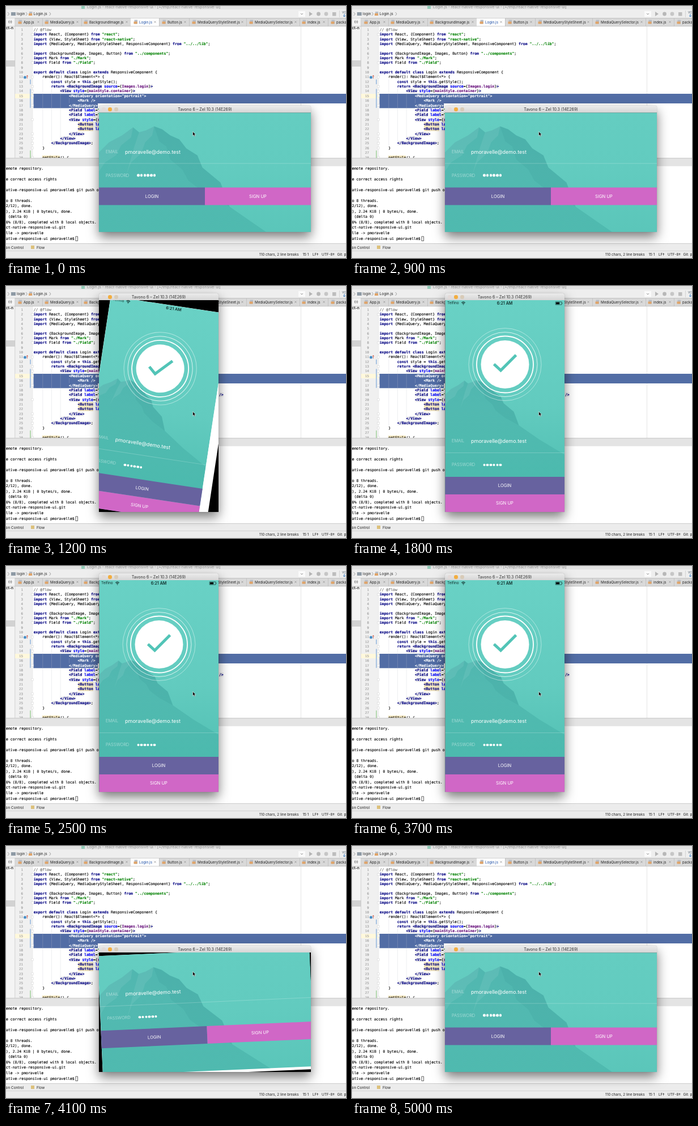
Animation, 600 px wide and 445 px high, one loop 5100 ms. Source, as an HTML page:

```html
<!DOCTYPE html>
<html lang="en">
<head>
<meta charset="utf-8">
<title>Rotating login screen</title>
<style>
html, body { margin: 0; width: 100%; height: 100%; overflow: hidden; background: #fff; }
#stage { position: absolute; left: 0; top: 0; width: 600px; height: 445px; overflow: hidden; font-family: Inter, Roboto, sans-serif; }
#stage > svg, pre { position: absolute; left: 0; top: 0; }
pre { margin: 0; color: #000; font-family: "DejaVu Sans Mono", monospace; -webkit-text-stroke: .12px; }
#editor { left: 48.7px; top: 37.8px; height: 230.7px; overflow: hidden; font-size: 6.48px; line-height: 8.36px; }
#nums { left: 14px; top: 37.8px; width: 16px; height: 230.7px; overflow: hidden; text-align: right; color: #999; font-size: 5.8px; line-height: 8.36px; }
#term { left: 0; top: 282.6px; font-size: 6.48px; line-height: 9.53px; }
.com { color: #666; }
.str { color: #008000; font-weight: bold; }
.key, .tag { color: #000080; font-weight: bold; }
.att { color: #0000ff; font-weight: bold; }
.tag, .att { background: #f1f1f1; }
.mem { color: #660e7a; font-weight: bold; }
.hit { background: #f3e6c0; }
.sel, .sel span { color: #fff; background: none; }

#win { --w: 374px; --h: 211px; position: absolute; left: 164px; bottom: 46px; width: var(--w); border-radius: 4px 4px 0 0;
  box-shadow: 0 0 1px rgba(0,0,0,.45), 0 9px 20px rgba(0,0,0,.52); }
#win.tall { --w: 211px; --h: 374px; }
#bar { position: relative; height: 12px; border-radius: 4px 4px 0 0; background: linear-gradient(#ebebeb, #d6d6d6);
  font-size: 7.07px; line-height: 13px; text-align: center; color: #333; }
#bar i { position: absolute; top: 3px; width: 6.5px; height: 6.5px; border-radius: 50%; }
#screen { position: relative; height: var(--h); overflow: hidden; background: #000; }
#layer { position: absolute; left: 50%; top: 50%; background: #fff; }
#page { position: absolute; left: 0; top: 0; width: var(--w); height: var(--h); color: #fff; }
#page > svg { position: absolute; left: 0; top: 0; width: 100%; height: 100%; }
#form { position: absolute; left: 0; right: 0; top: 48px; }
.tall #form { top: 228px; }
.row { position: relative; box-sizing: border-box; height: 42px; line-height: 42px; }
.row:first-child { border-bottom: 1px solid rgba(255,255,255,.22); }
.row span { position: absolute; left: 12px; font-size: 7.4px; font-weight: 300; color: rgba(255,255,255,.6); }
.row b { position: absolute; left: 46px; font-size: 9px; font-weight: 400; }
.row i { position: absolute; top: 18.7px; width: 4.6px; height: 4.6px; border-radius: 50%; background: #fff; }
#btns { display: flex; }
.tall #btns { flex-direction: column; }
#btns div { flex: 1 0 auto; width: 50%; height: 31px; line-height: 31px; text-align: center; font-size: 7.6px; background: #67629f; }
.tall #btns div { width: 100%; }
#btns div + div { background: #d067c6; }
#status { position: absolute; left: 0; right: 0; top: 0; height: 11px; line-height: 11px; text-align: center; font-size: 7.1px; font-weight: 600; color: #12302d; }
#status span { position: absolute; left: 4px; font-size: 6.5px; font-weight: 400; }
#status svg { position: absolute; top: 0; }
#mark, #status { display: none; }
.tall #mark, .tall #status { display: block; }
</style>
</head>
<body>
<div id="stage">
  <svg id="ide" width="600" height="445"></svg>
  <pre id="nums"></pre>
  <pre id="editor"></pre>
  <pre id="term">emote repository.

e correct access rights

ative-responsive-ui pmoravelle$ git push o

o 8 threads.
2/12), done.
), 2.24 KiB | 0 bytes/s, done.
 (delta 0)
0% (8/8), completed with 8 local objects.
ct-native-responsive-ui.git
lle -> pmoravelle
ative-responsive-ui pmoravelle$</pre>
  <div id="win">
    <div id="bar">
      <i style="left:5px;background:#e3dad8"></i><i style="left:16px;background:#f3ad40"></i><i style="left:27px;background:#d8cbb8"></i>
      Tavono 6 – Zel 10.3 (14E269)
    </div>
    <div id="screen">
      <div id="layer">
        <div id="page">
          <svg viewBox="0 0 211 374" preserveAspectRatio="xMidYMid slice">
            <defs>
              <linearGradient id="sky" x2="0" y2="1"><stop stop-color="#69d1c5"/><stop offset=".5" stop-color="#62cbbf"/><stop offset="1" stop-color="#4bbbae"/></linearGradient>
              <linearGradient id="rock" x2="0" y2="1"><stop stop-color="#2f8f92" stop-opacity=".36"/><stop offset=".4" stop-color="#2f9792" stop-opacity=".28"/><stop offset="1" stop-color="#35a89c" stop-opacity=".15"/></linearGradient>
            </defs>
            <path fill="url(#sky)" d="M0 0H211V374H0z"/>
            <path fill="url(#rock)" d="M0 167L10 157 23 150 34 142 40 147 47 145 55 141 63 144 71 150 80 154 87 163 98 170 103 182 121 197 130 221 166 246 211 273V374H0z"/>
            <path fill="#fff" opacity=".07" d="M0 167L10 157 23 150 34 142 32 152 22 160 17 170 6 177 0 186zM55 141L53 150 46 157 42 168 32 177 27 190 35 162 40 147 47 145z"/>
            <path fill="#1f8084" opacity=".1" d="M55 141L60 156 67 161 71 174 83 184 89 195 106 208 130 221 121 197 103 182 98 170 87 163 80 154 71 150 63 144z"/>
          </svg>
          <svg id="mark" viewBox="0 0 211 374" fill="none" stroke="#fff">
            <circle cx="105.5" cy="113.5" r="42.5" fill="#fff" stroke="none"/>
            <circle cx="105.5" cy="113.5" r="50" stroke-width="1.8"/>
            <circle cx="105.5" cy="113.5" r="57" opacity=".75"/>
            <circle cx="105.5" cy="113.5" r="64" opacity=".45"/>
            <path d="M86 113L98 124 125 97" stroke="#52c4b7" stroke-width="5"/>
          </svg>
          <div id="form">
            <div class="row"><span>EMAIL</span><b>pmoravelle@demo.test</b></div>
            <div class="row" id="pass"><span>PASSWORD</span></div>
            <div id="btns"><div>LOGIN</div><div>SIGN UP</div></div>
          </div>
        </div>
        <div id="status"><span>Telfino</span>6:21 AM
          <svg width="9" height="11" style="left:28px" fill="none" stroke="#12302d" stroke-width="1.2"><path d="M.8 4.6Q4 1.6 7.2 4.6M2.2 6.3Q4 4.6 5.8 6.3M3.5 7.8H4.6"/></svg>
          <svg width="14" height="11" style="right:3px" stroke="#12302d" stroke-width=".7"><path d="M.5 3H11.5V8H.5z" fill="none"/><path d="M1.6 4H7.5V7H1.6zM12.7 4.8V6.2"/></svg>
        </div>
      </div>
    </div>
  </div>
  <svg width="600" height="445"><path d="M329.6 221.8V229.3L331.3 227.7 332.5 230.5 333.8 229.9 332.6 227.2H334.9z" fill="#000" stroke="#fff" stroke-width=".6"/></svg>
</div>
<script>
const $ = id => document.getElementById(id);
const rect = (x, y, w, h, fill) => `<rect x="${x}" y="${y}" width="${w}" height="${h}" fill="${fill}"/>`;
const text = (x, y, s, size = 6.3, fill = '#222') => `<text x="${x}" y="${y}" font-size="${size}" fill="${fill}">${s}</text>`;
const line = (d, color, w = 0.8) => `<path d="${d}" fill="none" stroke="${color}" stroke-width="${w}"/>`;
const file = (x, y) => rect(x, y, 5.5, 7, '#b9bec6') + rect(x - 1, y + 3, 6, 4, '#e0a468');
const LINE = 8.36, TOP = 37.8, INDENT = 15.6;
const row = n => TOP + (n - 1) * LINE;

function chrome() {
  const s = [
    rect(0, 0, 600, 6, '#e2e2e2'), rect(133, 0, 6, 5, '#94cbb8'),
    text(143, 3.8, 'Login.js - react-native-responsive-ui - [~/tmp/react-native-responsive-ui]', 6.75, '#8c8c8c'),
    rect(0, 6, 600, 15.5, '#eeeeee'), rect(0, 21, 600, 15, '#d9d9d9'), rect(0, 21, 600, 0.7, '#b9b9b9'),
    line('M3 11L5.5 14 3 17M35 11L37.5 14 35 17M76.5 11L79 14 76.5 17', '#8f8f8f'),
    rect(9, 11, 8, 6, '#8e9aa5'), text(19, 16.3, 'login'), file(41, 10), text(48.5, 16.3, 'Login.js', 6.6),
    rect(516, 9, 12, 10, '#fafafa'), line('M520 13L522 15 524 13', '#777'),
    '<path d="M535 10L541 14 535 18z" fill="#b5b5b5"/><circle cx="551.5" cy="14" r="3.4" fill="#b8b8b8"/><circle cx="565" cy="14" r="3.4" fill="#c6c6c6"/>',
    rect(576, 11, 6.5, 6.5, '#bdbdbd'), rect(588, 8, 0.7, 12, '#c8c8c8'),
    text(593, 13, 'VCS', 4.6, '#456'), line('M597 14V19M595 17L597 19 599 17', '#3a7fc4', 1),
  ];
  // editor
  s.push(rect(0, 36, 600, 233, '#fff'), rect(0, 21.5, 16, 247.5, '#f4f4f4'), rect(0, 96, 16, 11, '#d2d2d2'),
    rect(16, 36, 31, 233, '#f0f0f0'), rect(15.5, 21, 0.7, 248, '#c4c4c4'), rect(46.8, 36, 0.5, 233, '#dedede'),
    `<g font-weight="600">${text(0, 40.5, 'ct-n', 6.6, '#222')}</g>`, line('M4 28H11M6 25L4.5 28 6 31M9 25V31', '#777'),
    rect(520, 36, 0.7, 233, '#d9d9d9'),
    rect(16, 155, 32, 8, '#fff8dc'), rect(48.5, 155, 551.5, 17, '#526da5'), rect(48.5, 172, 113.5, LINE, '#526da5'),
    rect(42, row(12), 2, LINE, '#a9c4e2'), rect(42, row(14), 2, LINE * 4, '#a9c4e2'), rect(42, row(27), 2, 14, '#b5d9b0'),
    `<circle cx="33.5" cy="${row(11) + 4.6}" r="2.5" fill="#4a8fc7"/>`, line('M37.5 128V122.5M36 124.3L37.5 122.5 39 124.3', '#c8503f'));
  // indent guides, from the first to the last line of each block
  [[12, 25], [14, 24], [15, 23], [16, 16]].forEach(([from, to], i) =>
    s.push(rect(49 + INDENT * (i + 1), row(from), 0.6, row(to + 1) - row(from), 'rgba(190,195,205,.45)')));
  for (const n of [2, 8, 11, 13, 14, 15, 17, 20, 23, 24, 25, 26, 28])
    s.push(`<rect x="44.9" y="${row(n) + 2.2}" width="3.6" height="3.6" fill="#fff" stroke="#d0d0d0" stroke-width=".5"/>`);
  // tabs: text start, label, right edge
  const tabs = [[31, 'App.js', 64], [78, 'MediaQuery.js', 133], [147, 'BackgroundImage.js', 220], [235, 'Login.js', 270], [285, 'Button.js', 323],
    [338, 'MediaQueryStyleSheet.js', 424], [439, 'MediaQuerySelector.js', 518], [532, 'index.js', 568], [583, 'package.json', 640]];
  tabs.forEach(([x, label, end], i) => {
    const active = i === 3, c = end - 7;
    if (active) s.push(rect(220, 21.7, 50, 14.3, '#fdfdfd'));
    s.push(file(x - 8.5, 24.5), text(x, 30.5, label, 6.25, active ? '#1b4fa8' : '#222'), rect(end, 22, 0.6, 14, '#b4b4b4'),
      line(`M${c - 1.5} 26.7L${c + 1.5} 29.7M${c + 1.5} 26.7L${c - 1.5} 29.7`, '#8d8d8d', 0.7));
  });
  s.push(rect(0, 35.5, 600, 0.7, '#bcbcbc'));
  // terminal and footer
  s.push(rect(0, 268.5, 600, 14, '#e4e4e4'), rect(0, 268.5, 600, 0.7, '#b5b5b5'), rect(0, 282, 600, 0.6, '#c9c9c9'),
    rect(0, 282.6, 600, 137, '#fff'), '<rect x="123" y="407" width="3.6" height="7.8" fill="none" stroke="#222" stroke-width=".7"/>',
    rect(0, 419, 600, 26, '#ececec'), rect(0, 419, 600, 0.7, '#bdbdbd'), rect(0, 432, 600, 0.7, '#c9c9c9'),
    text(-5.3, 428.6, 'sion Control', 6.4), rect(44, 423, 6, 6, '#dcc07c'), text(54, 428.6, 'Flow', 6.4),
    text(447, 441.4, '110 chars, 2 line breaks', 6.35), text(523.5, 441.4, '15:1', 6.35),
    text(541, 441.4, 'LF‡', 6.35), text(557, 441.4, 'UTF-8‡', 6.35), text(584.5, 441.4, 'Git: p', 6.35));
  return s.join('');
}

const code = `// @flow
import React, {Component} from "react";
import {View, StyleSheet} from "react-native";
import {MediaQuery, MediaQueryStyleSheet, ResponsiveComponent} from "../../lib";

import {BackgroundImage, Images, Button} from "../components";
import Mark from "./Mark";
import Field from "./Field";

export default class Login extends ResponsiveComponent {
    render(): React$Element<*> {
        const style = this.getStyle();
        return <BackgroundImage source={Images.login}>
            <View style={mainStyle.container}>
                <MediaQuery orientation="portrait">
                    <Mark />
                </MediaQuery>
                <Field label="Email" />
                <Field label="Password" style={style.field} secureTextEntry={shown} />
                <View style={style.buttons}>
                    <Button label="Login" />
                    <Button label="Sign Up" />
                </View>
            </View>
        </BackgroundImage>;
    }

    getStyle() {`.split('\n');

const kinds = ['com', 'str', 'key', 'tag', 'att', 'mem', 'hit'];
const token = /(\/\/.*)|("[^"]*")|\b(import|from|export|default|class|extends|const|return|this)\b|(<\/?[A-Z]\w*|\/?>(?! \{))|(\w+)(?==[{"])|(\w+\.\w+)(?=})|(getStyle)(?=\(\) )/g;

function paint(src, i) {
  const html = src.replace(token, (m, ...groups) => {
    const kind = kinds[groups.slice(0, 7).findIndex(Boolean)];
    return `<span class="${kind}${m === '<Button' ? ' hit' : ''}">${m.replace('<', '&lt;')}</span>`;
  });
  return i > 13 && i < 17 ? `<span class="sel">${html}</span>` : html;
}

$('ide').innerHTML = chrome();
$('editor').innerHTML = code.map(paint).join('\n');
$('nums').textContent = code.map((_, i) => i + 1).join('\n');
for (let i = 0; i < 6; i++) $('pass').insertAdjacentHTML('beforeend', `<i style="left:${67.2 + i * 5.7}px"></i>`);

const LOOP = 5100, STEP = 100, TURN = 300, TO_TALL = 960, TO_WIDE = 3832;
const LONG = 374, SHORT = 211;
const start = performance.now();

// The window swaps at once; its view turns in from the old orientation while its bounds morph.
function draw(t) {
  const tall = t >= TO_TALL && t < TO_WIDE;
  const since = t < TO_TALL ? TURN : t - (tall ? TO_TALL : TO_WIDE);
  const left = (1 + Math.cos(Math.PI * Math.min(since / TURN, 1))) / 2;
  const shift = (LONG - SHORT) * left;
  const layer = $('layer').style;
  $('win').classList.toggle('tall', tall);
  layer.width = (tall ? SHORT + shift : LONG - shift) + 'px';
  layer.height = (tall ? LONG - shift : SHORT + shift) + 'px';
  layer.transform = `translate(-50%, -50%) rotate(${(tall ? 90 : -90) * left}deg)`;
}

function tick() {
  const t = (performance.now() - start + 20) % LOOP;
  draw(Math.floor(t / STEP) * STEP);
  requestAnimationFrame(tick);
}
tick();
</script>
</body>
</html>
```
